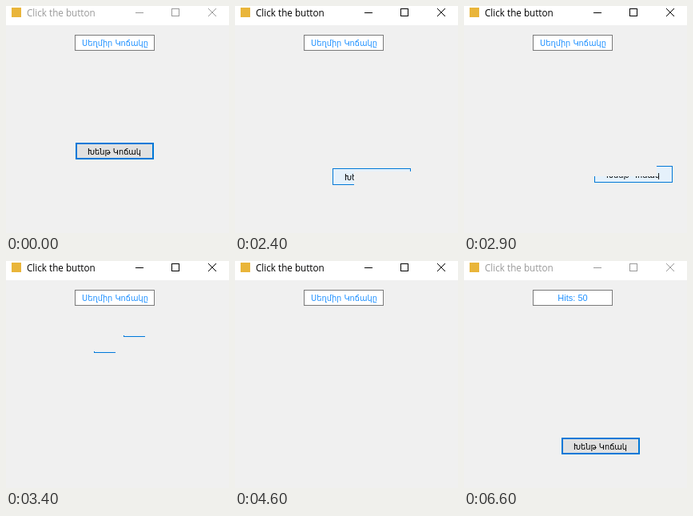
An HTML page with a canvas for the animation above (7.9 s loop, 279 px wide and 284 px high).

```html
<!DOCTYPE html>
<html lang="hy">
<head>
<meta charset="utf-8">
<title>Click the button</title>
<style>
  html, body { margin: 0; width: 100%; height: 100%; overflow: hidden; background: #f0f0f0; }
  canvas { display: block; width: 279px; height: 284px; }
</style>
</head>
<body>
<canvas id="stage"></canvas>
<script>
const LOOP = 7900, STEP = 100;
const HOVER = 1900, CHASE_START = 2400, CHASE_END = 4600, COUNTED = 5700, BLUR = 6600;
const WIDTH = 98, HEIGHT = 21;
const BACK = '#f0f0f0', BLUE = '#0078d7';
const UI_FONT = '11.7px "Open Sans", sans-serif';
const ARMENIAN_FONT = '9.8px "DejaVu Sans", sans-serif';
const COUNT_FONT = '11px "Liberation Sans", Arial, sans-serif';

// Turning points of the escape.
const route = [
  { t: 2400, x: 122, y: 203 },
  { t: 2700, x: 203, y: 215 },
  { t: 3100, x: 123, y: 184 },
  { t: 3300, x: 184, y: 54 },
  { t: 3600, x: 73, y: 114 },
  { t: 3900, x: 2, y: 152 },
  { t: 4600, x: 80, y: 222 }
];

const canvas = document.getElementById('stage');
const ctx = canvas.getContext('2d');
const scale = window.devicePixelRatio || 1;
canvas.width = 279 * scale;
canvas.height = 284 * scale;
ctx.scale(scale, scale);

function box(x, y, w, h, color) {
  ctx.fillStyle = color;
  ctx.fillRect(x, y, w, h);
}

function framed(x, y, w, h, border, fill, line = 1) {
  box(x, y, w, h, border);
  box(x + line, y + line, w - 2 * line, h - 2 * line, fill);
}

function text(value, x, y, font, color, align = 'center') {
  ctx.font = font;
  ctx.fillStyle = color;
  ctx.textAlign = align;
  ctx.fillText(value, x, y);
}

function clipped(x, y, w, h, paint) {
  ctx.save();
  ctx.beginPath();
  ctx.rect(x, y, w, h);
  ctx.clip();
  paint();
  ctx.restore();
}

function button(x, y, hover) {
  framed(x, y, WIDTH, HEIGHT, BLUE, hover ? '#e5f1fb' : '#e1e1e1', hover ? 1 : 2);
  text('Խենթ Կոճակ', x + 48.5, y + 15, ARMENIAN_FONT, '#000');
}

function position(time) {
  const next = Math.max(1, route.findIndex(point => point.t >= time));
  const a = route[next - 1], b = route[next];
  const k = (time - a.t) / (b.t - a.t);
  return { x: Math.round(a.x + (b.x - a.x) * k), y: Math.round(a.y + (b.y - a.y) * k) };
}

function corner({ x, y }) {
  clipped(x, y + HEIGHT - 2, 27, 2, () => button(x, y, true));
}

// The next position wipes the button before it is fully painted.
function fleeingButton(time) {
  const now = Math.floor(time / STEP) * STEP;
  const here = position(now), next = position(now + STEP);
  if (now >= 3200 && now < 4000) {
    corner(here);
    corner(next);
  } else {
    clipped(here.x, here.y, WIDTH, HEIGHT, () => {
      button(here.x, here.y, true);
      box(next.x, next.y, WIDTH, HEIGHT, BACK);
    });
  }
}

function titleBar(active) {
  const ink = active ? '#000' : '#999';
  box(0, 0, 279, 24, '#fff');
  box(7, 2, 12, 12, '#e9b53a');
  text('Click the button', 26, 13, UI_FONT, ink, 'left');
  box(162, 8, 10, 1, ink);
  framed(207, 3, 10, 10, ink, '#fff');
  ctx.strokeStyle = ink;
  ctx.beginPath();
  ctx.moveTo(253, 3);
  ctx.lineTo(263, 13);
  ctx.moveTo(263, 3);
  ctx.lineTo(253, 13);
  ctx.stroke();
}

function draw(time) {
  box(0, 0, 279, 284, BACK);
  titleBar(time >= CHASE_START && time < BLUR);

  if (time < CHASE_START) button(87, 171, time >= HOVER);
  else if (time < CHASE_END) fleeingButton(time);
  else if (time >= COUNTED) button(122, 221, false);

  framed(86, 36, 100, 20, '#7a7a7a', '#fff');
  if (time >= COUNTED) text('Hits: 50', 136, 50, COUNT_FONT, '#1e90ff');
  else text('Սեղմիր Կոճակը', 136.5, 50, ARMENIAN_FONT, '#1e90ff');
}

const start = performance.now();
function tick() {
  draw((performance.now() - start) % LOOP);
  requestAnimationFrame(tick);
}
tick();
</script>
</body>
</html>
```
